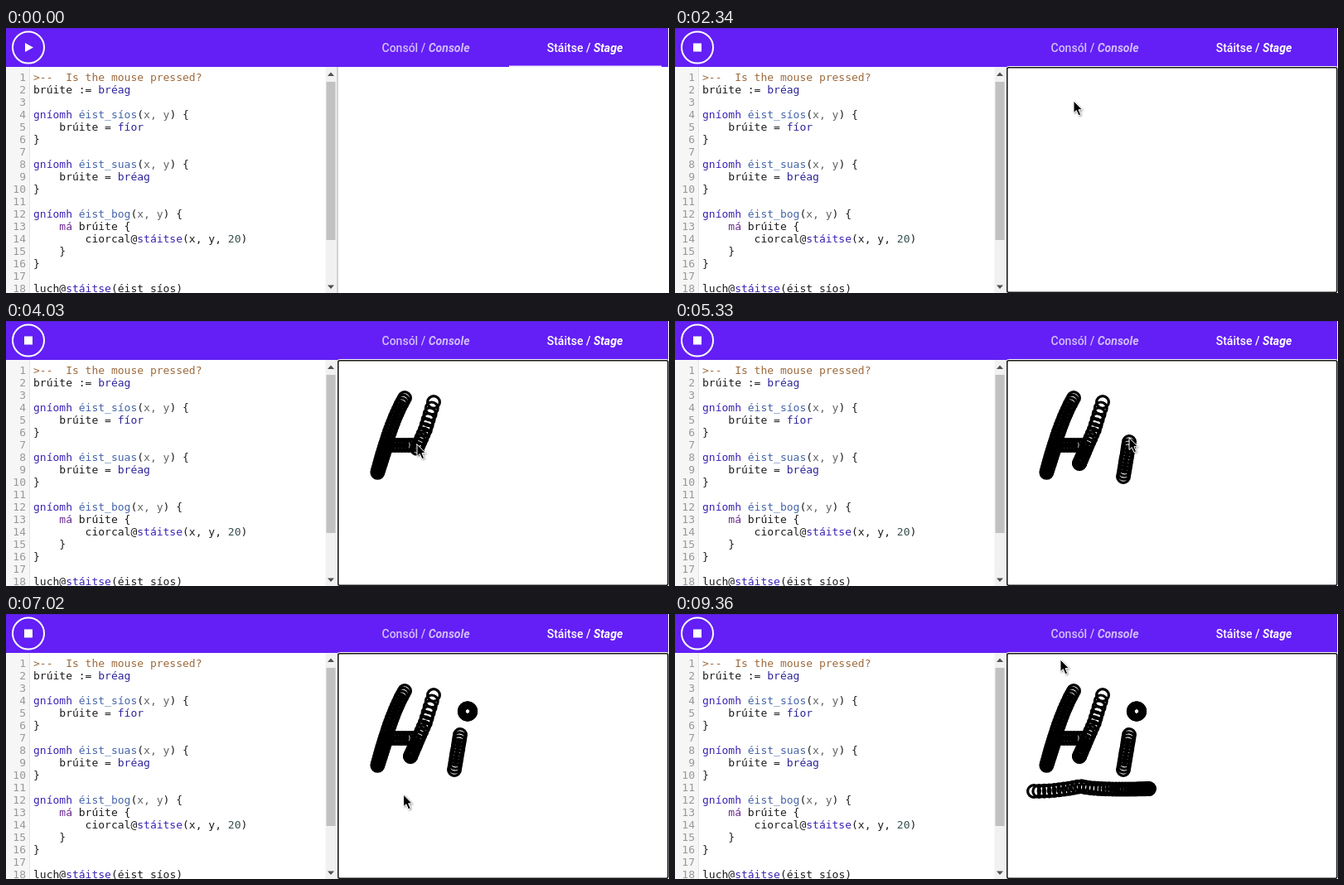
These frames come from a looping animation (800x320 px, 9.49 s). An HTML page:

```html
<!DOCTYPE html>
<html lang="ga">
<head>
<meta charset="utf-8">
<title>Stáitse</title>
<style>
  html, body { margin: 0; width: 100%; height: 100%; overflow: hidden; background: #fff; }
  #app { position: relative; width: 800px; height: 320px; overflow: hidden; background: #fff; }
  svg { position: absolute; left: 0; top: 0; }
  pre {
    position: absolute; top: 52px; margin: 0; color: #1c1c1c;
    font: 13px/15px "DejaVu Sans Mono", monospace;
  }
  #gutter {
    top: 47px; left: 0; width: 24px; height: 272px; padding: 5px 4px 0 0;
    background: #f6f6f6; border-right: 1px solid #e4e4e4; color: #999; text-align: right;
  }
  #code { left: 33px; }
  .com { color: #9c6a3c; }
  .key { color: #3a22b4; }
  .def { color: #4565a8; }
  .atom { color: #2e2498; }
  .arg { color: #606468; }
  .if { color: #6a2a90; }
  .num { color: #3a5050; }
  .tab { font: 500 14px Roboto, sans-serif; fill: #fff; text-anchor: middle; }
  .tab tspan { font-weight: 700; font-style: italic; }
  .dim { fill: #d2bdfc; }
  #cursor { filter: drop-shadow(1px 1px 1px rgba(0, 0, 0, .4)); }
</style>
</head>
<body>
<div id="app">
  <pre id="gutter"></pre>
  <pre id="code"><span class="com">&gt;--  Is the mouse pressed?</span>
brúite := <span class="atom">bréag</span>

<span class="key">gníomh</span> <span class="def">éist_síos</span>(<span class="arg">x, y</span>) {
    brúite = <span class="atom">fíor</span>
}

<span class="key">gníomh</span> <span class="def">éist_suas</span>(<span class="arg">x, y</span>) {
    brúite = <span class="atom">bréag</span>
}

<span class="key">gníomh</span> <span class="def">éist_bog</span>(<span class="arg">x, y</span>) {
    <span class="if">má</span> brúite {
        ciorcal@<span class="key">stáitse</span>(x, y, <span class="num">20</span>)
    }
}

luch@<span class="key">stáitse</span>(éist_síos)</pre>

  <svg width="800" height="320" viewBox="0 0 800 320">
    <!-- header -->
    <path d="M0 0H799V47H0Z" fill="#631ff5"/>
    <path d="M0 0H799V.6H0Z" fill="#4a22b0"/>
    <circle cx="27" cy="23.5" r="19" fill="none" stroke="#fff" stroke-width="2"/>
    <path id="play" d="M23 18L33 23.5L23 29Z" fill="#fff"/>
    <path id="stop" d="M22 18.5h10v10h-10Z" fill="#fff"/>
    <text class="tab dim" x="506.5" y="28.5">Consól / <tspan>Console</tspan></text>
    <text class="tab" x="698.5" y="28.5">Stáitse / <tspan>Stage</tspan></text>
    <path id="line" d="M607 45.5H791V47.5H607Z" fill="#f6f0ff"/>

    <!-- scrollbar and divider -->
    <path d="M385.5 47H399V320H385.5Z" fill="#f1f1f1"/>
    <path d="M386.5 65H397.5V256H386.5Z" fill="#c1c1c1"/>
    <path d="M388 58L392 53.5L396 58ZM388 310.5L392 315L396 310.5Z" fill="#505050"/>
    <path d="M399 47H401V320H399Z" fill="#d2d2d2"/>

    <!-- running stage -->
    <g id="ring" fill="none">
      <rect x="399.5" y="46.5" width="400.5" height="273.5" rx="3" stroke="#fff"/>
      <rect x="400.75" y="47.75" width="398" height="271.5" rx="2" stroke="#151515" stroke-width="1.6" fill="#fff"/>
    </g>
    <g id="ink" fill="none" stroke="#000" stroke-width="3.2"></g>
    <path id="cursor" d="M0 0V14.5L3.3 11.6L6 17.8L8.6 16.6L6 10.7H10.5Z"
          fill="#000" stroke="#fff" stroke-width="1"/>
  </svg>
</div>
<script>
const LOOP = 9490, STEP = 130, RUN = 1560;
const RADIUS = 7.4, STAMP = 26, TIP = 5;

const $ = id => document.getElementById(id);
const show = (el, on) => { el.style.display = on ? "" : "none"; };
const make = (tag, attrs) => {
  const el = document.createElementNS("http://www.w3.org/2000/svg", tag);
  for (const k in attrs) el.setAttribute(k, attrs[k]);
  return el;
};

const moves = [], stamps = [];

// Pointer travels along d, slowing down when power > 1
function move(start, end, d, power = 1) {
  const line = make("path", { d }), length = line.getTotalLength();
  const at = t => {
    const u = Math.min(1, (t - start) / (end - start));
    return line.getPointAtLength(length * (1 - (1 - u) ** power));
  };
  moves.push({ start, at });
  return at;
}

// Same, with the button held: circles at a steady rate
function stroke(start, end, d, power) {
  const at = move(start, end, d, power);
  for (let t = start; t <= end; t += STAMP) {
    const { x, y } = at(t);
    const el = make("circle", { cx: x, cy: y, r: RADIUS });
    $("ink").append(el);
    stamps.push({ el, t });
  }
}

move(1040, 1430, "M-8 30H27");
move(1690, 2340, "M28 30L481 93");
stroke(2600, 3640, "M481 93Q464 122 448 184L459 150H490");
move(3640, 3770, "M490 150L516 98");
stroke(3770, 4290, "M516 98L506 131L488 172", 2);
move(4290, 4810, "M488 172L541 188");
stroke(5070, 5330, "M541 188L548 146");
move(5330, 5720, "M548 146L555 115");
stroke(5720, 6240, "M555 115a3 3 0 1 1 4 5a3 3 0 1 1-4-5");
move(6500, 7280, "M555 115L479 224L433 214", 1.2);
stroke(7540, 8450, "M433 214Q463 214 489 208Q510 213 572 211", 1.6);
move(8580, 9360, "M572 211L465 60");

$("gutter").textContent = Array.from({ length: 18 }, (_, i) => i + 1).join("\n");

function draw() {
  const t = Math.floor(performance.now() % LOOP / STEP) * STEP;
  const running = t >= RUN;
  show($("play"), !running);
  show($("line"), !running);
  show($("stop"), running);
  show($("ring"), running);

  const now = moves.filter(m => m.start <= t).pop();
  show($("cursor"), now);
  if (now) {
    const { x, y } = now.at(t);
    $("cursor").setAttribute("transform", `translate(${x} ${y - TIP})`);
  }
  for (const s of stamps) show(s.el, s.t <= t);
  requestAnimationFrame(draw);
}
draw();
</script>
</body>
</html>
```
